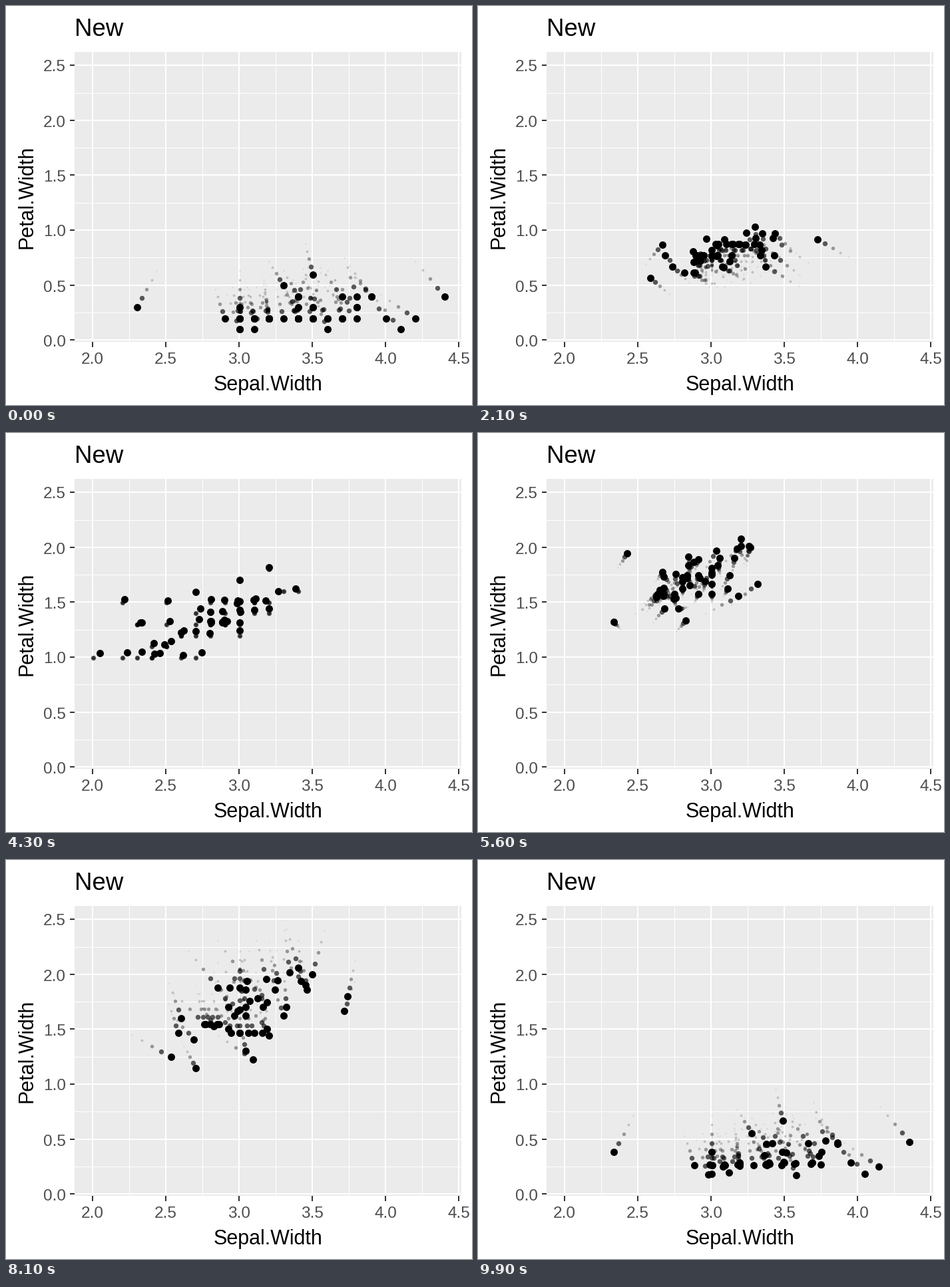
A matplotlib script that plays this animation: 700 px wide and 600 px high, repeating every 10 s.

```python
import numpy as np
import matplotlib.pyplot as plt
from matplotlib.animation import FuncAnimation
from matplotlib.patches import Rectangle

W, H, DPI = 700, 600, 100
FRAMES = 100
LEFT, RIGHT, TOP, BOTTOM = 103, 684, 69, 505

plt.rcParams["font.family"] = "Liberation Sans"

# Flower widths in tenths, one row of the same index per dot.
setosa = (
    [35, 30, 32, 31, 36, 39, 34, 34, 29, 31, 37, 34, 30, 30, 40, 44, 39,
     35, 38, 38, 34, 37, 36, 33, 34, 30, 34, 35, 34, 32, 31, 34, 41, 42,
     31, 32, 35, 36, 30, 34, 35, 23, 32, 35, 38, 30, 38, 32, 37, 33],
    [2, 2, 2, 2, 2, 4, 3, 2, 2, 1, 2, 2, 1, 1, 2, 4, 4,
     3, 3, 3, 2, 4, 2, 5, 2, 2, 4, 2, 2, 2, 2, 4, 1, 2,
     2, 2, 2, 1, 2, 2, 3, 3, 2, 6, 4, 3, 2, 2, 2, 2])
versicolor = (
    [32, 32, 31, 23, 28, 28, 33, 24, 29, 27, 20, 30, 22, 29, 29, 31, 30,
     27, 22, 25, 32, 28, 25, 28, 29, 30, 28, 30, 29, 26, 24, 24, 27, 27,
     30, 34, 31, 23, 30, 25, 26, 30, 26, 23, 27, 30, 29, 29, 25, 28],
    [14, 15, 15, 13, 15, 13, 16, 10, 13, 14, 10, 15, 10, 14, 13, 14, 15,
     10, 15, 11, 18, 13, 15, 12, 13, 14, 14, 17, 15, 10, 11, 10, 12, 16,
     15, 16, 15, 13, 13, 13, 12, 14, 12, 10, 13, 12, 13, 13, 11, 13])
virginica = (
    [33, 27, 30, 29, 30, 30, 25, 29, 25, 36, 32, 27, 30, 25, 28, 32, 30,
     38, 26, 22, 32, 28, 28, 27, 33, 32, 28, 30, 28, 30, 28, 38, 28, 28,
     26, 30, 34, 31, 30, 31, 31, 31, 27, 32, 33, 30, 25, 30, 34, 30],
    [25, 19, 21, 18, 22, 21, 17, 18, 18, 25, 20, 19, 21, 20, 24, 23, 18,
     22, 23, 15, 23, 20, 20, 18, 21, 18, 18, 18, 21, 16, 19, 20, 22, 15,
     14, 23, 24, 18, 18, 21, 24, 23, 19, 23, 25, 23, 19, 20, 23, 18])
stops = [np.array(s) / 10 for s in (setosa, versicolor, virginica, setosa)]


def to_x(v):
    return 130 + 220 * (v - 2)


def to_y(v):
    return 502.2 - 165.15 * v


def points(frame):
    """Pixel positions of all dots: rest, then glide linearly to the next stop."""
    stage = np.interp(frame % FRAMES, [0, 8, 33, 42, 67, 76, 100],
                      [0, 0, 1, 1, 2, 2, 3])
    i = min(int(stage), 2)
    x, y = stops[i] + (stops[i + 1] - stops[i]) * (stage - i)
    xy = np.column_stack([to_x(x), to_y(y)])
    return np.floor(xy + 1e-6) + 0.5


fig = plt.figure(figsize=(W / DPI, H / DPI), dpi=DPI, facecolor="white")
ax = fig.add_axes([0, 0, 1, 1])
ax.set_xlim(0, W)
ax.set_ylim(H, 0)
ax.axis("off")


def box(x, y, w, h, color):
    ax.add_patch(Rectangle((x, y), w, h, fc=color, lw=0, antialiased=False))


def grid(values, width):
    for v, is_x in values:
        if is_x:
            box(round(to_x(v)) - width // 2, TOP, width, BOTTOM - TOP, "white")
        else:
            box(LEFT, round(to_y(v)) - width // 2, RIGHT - LEFT, width, "white")


x_ticks = np.arange(2, 4.6, 0.5)
y_ticks = np.arange(0, 2.6, 0.5)

box(LEFT, TOP, RIGHT - LEFT, BOTTOM - TOP, "#EBEBEB")
grid([(v + 0.25, True) for v in x_ticks[:-1]]
     + [(v + 0.25, False) for v in y_ticks[:-1]], 1)
grid([(v, True) for v in x_ticks] + [(v, False) for v in y_ticks], 2)

label = dict(fontsize=17.6, color="#4D4D4D", va="baseline")
for v in x_ticks:
    x = round(to_x(v))
    box(x - 1, BOTTOM, 2, 8, "#333333")
    ax.text(x, 538, f"{v:.1f}", ha="center", **label)
for v in y_ticks:
    y = round(to_y(v))
    box(LEFT - 7, y - 1, 7, 2, "#333333")
    ax.text(90, y + 9.5, f"{v:.1f}", ha="right", **label)

ax.text(103, 45, "New", fontsize=26.4, va="baseline")
ax.text(394, 578, "Sepal.Width", fontsize=22, ha="center", va="baseline")
ax.text(40, 287, "Petal.Width", fontsize=22, rotation=90,
        ha="right", va="center", rotation_mode="default").set(
            rotation_mode="anchor", ha="center", va="baseline")

# Fading wake, oldest layer first, with the solid dots on top.
diameters = [11, 7.4, 5.4, 3.8, 2.6, 2]
layers = []
for lag in range(5, -1, -1):
    dots = ax.scatter([], [], s=(diameters[lag] * 72 / DPI) ** 2, c="black",
                      alpha=(1 - lag / 7) ** 3, linewidths=0,
                      antialiased=False, zorder=10 - lag)
    layers.append((lag, dots))


def draw(frame):
    for lag, dots in layers:
        dots.set_offsets(points(frame - lag))
    return [dots for _, dots in layers]


anim = FuncAnimation(fig, draw, frames=FRAMES, interval=100,
                     init_func=lambda: draw(0), repeat=True, repeat_delay=0)
plt.show()
```
